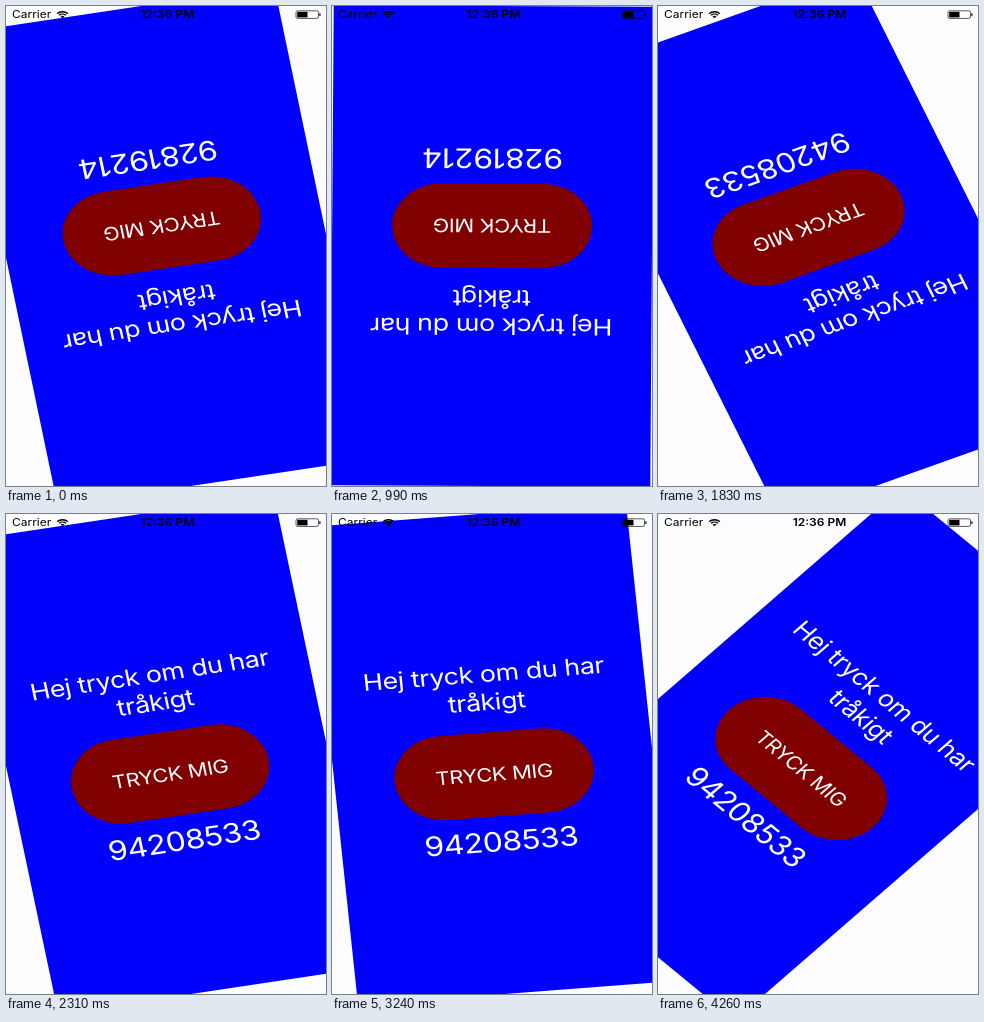
Recreate the animation shown at these times as an HTML page with a canvas. Size 320 px wide and 480 px high, loop 4.29 s.

```html
<!DOCTYPE html>
<html lang="sv">
<head>
<meta charset="utf-8">
<title>Tryck mig</title>
<style>
html, body { margin: 0; width: 100%; height: 100%; overflow: hidden; background: #fdfdff; }
canvas { display: block; width: 320px; height: 480px; }
</style>
</head>
<body>
<canvas id="stage"></canvas>
<script>
const W = 320, H = 568, STAGE_H = 480;   // the screen is squeezed vertically onto the stage
const STEP = 30, LOOP = 4290, NEW_NUMBER = 1830;
const FONT = 'Inter, "Liberation Sans", sans-serif';

// [time in ms, clockwise angle in degrees]: close to 12 degrees per step
const TURN = [[0, 170], [630, 396.4], [1350, 684.3], [2310, 1069.9],
              [2880, 1289.8], [3630, 1592], [4260, 1844.2]];

const canvas = document.getElementById('stage');
const ctx = canvas.getContext('2d');
const dpr = window.devicePixelRatio || 1;
canvas.width = W * dpr;
canvas.height = STAGE_H * dpr;

function angleAt(t) {
  let i = 1;
  while (i < TURN.length - 1 && t > TURN[i][0]) i++;
  const [t0, a0] = TURN[i - 1], [t1, a1] = TURN[i];
  return a0 + (a1 - a0) * (t - t0) / (t1 - t0);
}

function text(str, x, y, size, color, { weight = 400, align = 'center', tracking = 0 } = {}) {
  ctx.font = `${weight} ${size}px ${FONT}`;
  ctx.letterSpacing = `${(tracking * size).toFixed(2)}px`;
  ctx.textAlign = align;
  ctx.fillStyle = color;
  ctx.fillText(str, x, y);
}

function pill(x, y, w, h, color) {
  ctx.fillStyle = color;
  ctx.beginPath();
  ctx.roundRect(x, y, w, h, h / 2);
  ctx.fill();
}

function drawPage(t) {
  const tight = { tracking: -0.017 };
  ctx.save();
  ctx.translate(W / 2, H / 2);
  ctx.rotate(angleAt(t) * Math.PI / 180);
  ctx.fillStyle = '#0000ff';
  ctx.fillRect(-W / 2, -H / 2, W, H);
  text('Hej tryck om du har', 0, -85.7, 27, '#fff', tight);
  text('tråkigt', 0, -52.2, 27, '#fff', tight);
  pill(-100, -26, 200, 100, '#800000');
  text('TRYCK MIG', 0, 32, 22, '#fff', tight);
  text(t < NEW_NUMBER ? '92819214' : '94208533', 0, 115.2, 32, '#fff', tight);
  ctx.restore();
}

function drawWifi(x, y) {
  const from = -Math.PI * 0.75, to = -Math.PI * 0.25;
  ctx.strokeStyle = ctx.fillStyle = '#000';
  ctx.lineWidth = 1.6;
  for (const r of [4.8, 7.6]) {
    ctx.beginPath();
    ctx.arc(x, y, r, from, to);
    ctx.stroke();
  }
  ctx.beginPath();
  ctx.moveTo(x, y);
  ctx.arc(x, y, 2.8, from, to);
  ctx.fill();
}

function drawBattery(x, y) {
  ctx.strokeStyle = ctx.fillStyle = '#000';
  ctx.lineWidth = 0.7;
  ctx.beginPath();
  ctx.roundRect(x, y, 22.5, 9, 1.8);
  ctx.stroke();
  ctx.fillRect(x + 1.2, y + 1.2, 10.3, 6.6);
  ctx.fillRect(x + 23.3, y + 3, 1.2, 3);
}

function drawStatusBar() {
  text('Carrier', 6, 14.4, 12, '#000', { align: 'left' });
  drawWifi(56.5, 14.4);
  text('12:36 PM', 161.5, 14.4, 12, '#000', { weight: 600 });
  drawBattery(290, 5.7);
}

function draw(t) {
  ctx.setTransform(dpr, 0, 0, dpr, 0, 0);
  ctx.fillStyle = '#fdfdff';
  ctx.fillRect(0, 0, W, STAGE_H);
  ctx.scale(1, STAGE_H / H);
  drawPage(t);
  drawStatusBar();
}

let start = null;
function tick(now) {
  if (start === null) start = now;
  const t = (now - start) % LOOP;
  draw(Math.floor(t / STEP) * STEP);
  requestAnimationFrame(tick);
}
draw(0);
requestAnimationFrame(tick);
</script>
</body>
</html>
```
